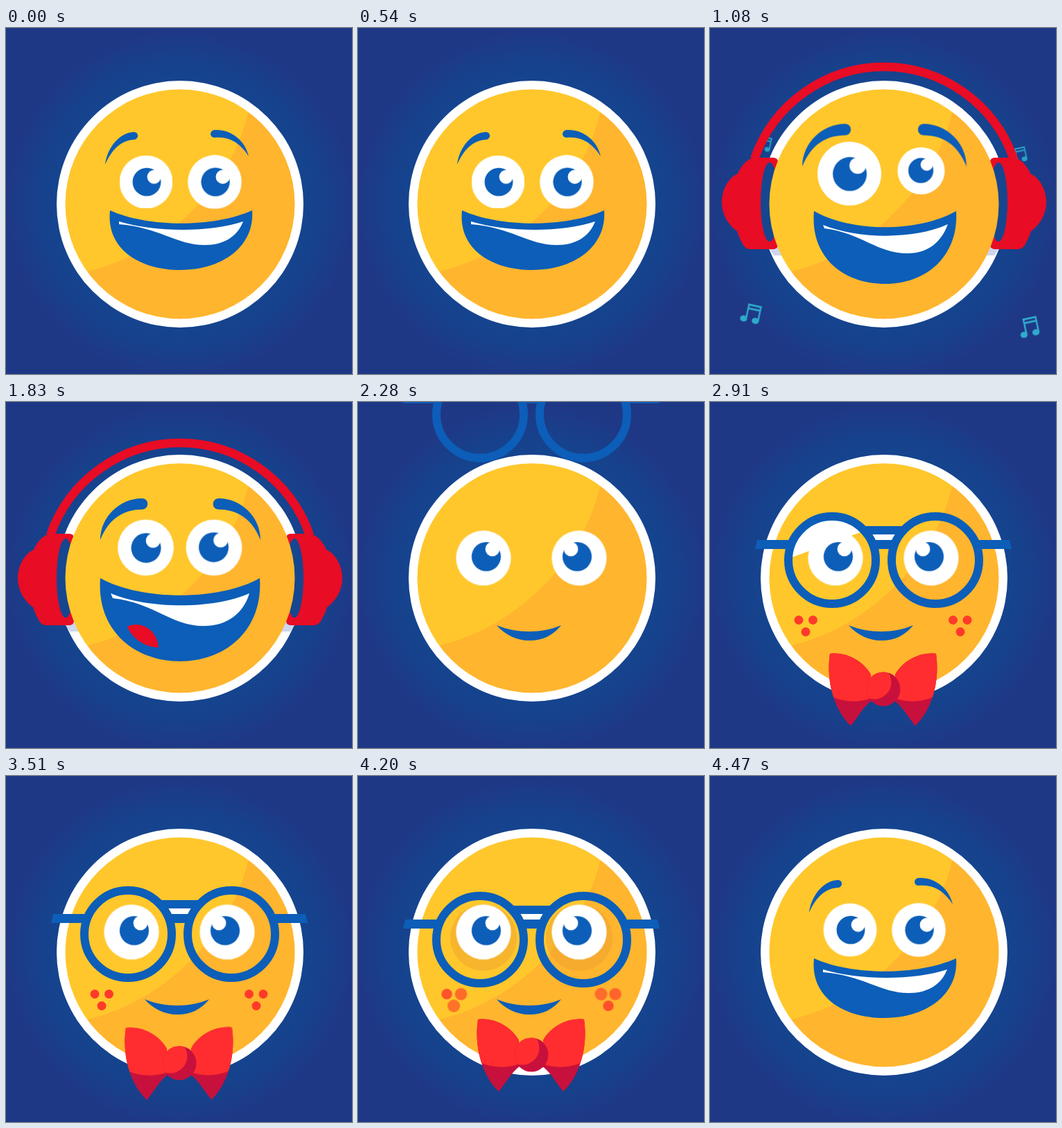
These frames come from a looping animation (499x499 px, 4500 ms). An HTML page:

```html
<!DOCTYPE html>
<html lang="en">
<head>
<meta charset="utf-8">
<title>Emoji moods</title>
<style>
html, body { margin: 0; width: 100%; height: 100%; overflow: hidden; background: #1f3886; }
svg { display: block; width: 100vw; height: 100vh; }
.a { animation: 4.5s ease-in-out infinite both; }
.blue { fill: #0c5eb8; }
.red { fill: #e80c25; }

/* headphones */
.phones { animation-name: phones; }
@keyframes phones {
  0%, 17.33% { transform: translateY(-335px); }
  21.33% { transform: translateY(8px); }
  24% { transform: translateY(-3px); }
  28.67% { transform: translateY(0); }
  31.33% { transform: translateY(4px); }
  34% { transform: translateY(0); }
  36.67% { transform: translateY(4px); }
  39.33%, 41.33% { transform: translateY(0); }
  43.33% { transform: translateY(10px); }
  48.67%, to { transform: translateY(-340px); }
}

/* music notes */
.note { fill: #2fb0cf; animation-timing-function: linear; }
.l { animation-name: rise-l; }
.r { animation-name: rise-r; }
@keyframes rise-l {
  0% { transform: translate(51px, 520px) rotate(12deg); opacity: 1; }
  7% { opacity: .85; }
  8.89% { transform: translate(86px, 60px) rotate(12deg) scale(.6); opacity: 0; }
  to { transform: translate(86px, 60px) scale(.6); opacity: 0; }
}
@keyframes rise-r {
  0% { transform: translate(465px, 520px) rotate(-12deg); opacity: 1; }
  7% { opacity: .85; }
  8.89% { transform: translate(439px, 60px) rotate(-12deg) scale(.6); opacity: 0; }
  to { transform: translate(439px, 60px) scale(.6); opacity: 0; }
}

/* eyes */
.eye-l { animation-name: eye-l; }
.eye-r { animation-name: eye-r; }
@keyframes eye-l {
  0%, 3.33%, 8.67%, 17.33%, 97.33%, to { transform: translate(202px, 222px) scale(.96); }
  6% { transform: translate(202px, 222px) scale(.96, .1); }
  24% { transform: translate(201px, 210px) scale(1.15); }
  29.33% { transform: translate(198px, 206px) scale(.85); }
  34.67% { transform: translate(201px, 210px) scale(1.15); }
  39.33%, 42% { transform: translate(201.5px, 210px) scale(1.01); }
  49.33%, 78%, 84%, 93.33% { transform: translate(181px, 225px) scale(.99); }
  81% { transform: translate(181px, 225px) scale(.99, .1); }
}
@keyframes eye-r {
  0%, 3.33%, 8.67%, 17.33%, 97.33%, to { transform: translate(301px, 222px) scale(.97); }
  6% { transform: translate(301px, 222px) scale(.97, .1); }
  24% { transform: translate(304.5px, 206px) scale(.85); }
  29.33% { transform: translate(301px, 210px) scale(1.15); }
  34.67% { transform: translate(304.5px, 206px) scale(.85); }
  39.33%, 42% { transform: translate(300px, 210px) scale(1.01); }
  49.33%, 78%, 84%, 93.33% { transform: translate(319px, 225px) scale(.99); }
  81% { transform: translate(319px, 225px) scale(.99, .1); }
}
.pupil-l { animation-name: pupil-l; }
.pupil-r { animation-name: pupil-r; }
@keyframes pupil-l {
  0%, 17.33%, 97.33%, to { transform: translate(1px, 0); }
  24%, 42% { transform: translate(.5px, .5px); }
  49.33%, 93.33% { transform: translate(4px, -2px); }
}
@keyframes pupil-r {
  0%, 17.33%, 97.33%, to { transform: translate(1px, 0); }
  24%, 42% { transform: translate(-.5px, -.5px); }
  49.33%, 93.33% { transform: translate(-3px, -2px); }
}
.spark-l { animation-name: spark-l; }
.spark-r { animation-name: spark-r; }
@keyframes spark-l {
  0%, 17.33%, 97.33%, to { transform: translate(11px, -7.5px); }
  24%, 42% { transform: translate(10px, -10.5px); }
  49.33%, 93.33% { transform: translate(9px, -11px); }
}
@keyframes spark-r {
  0%, 17.33%, 97.33%, to { transform: translate(11px, -7.5px); }
  24%, 42% { transform: translate(10px, -10px); }
  49.33%, 93.33% { transform: translate(-9px, -11px); }
}

/* brows */
.brows { transform-origin: 251px 170px; animation-name: brows; }
@keyframes brows {
  0%, 17.33%, 29.33%, 42%, 97.33%, to { transform: none; opacity: 1; }
  24% { transform: scale(1.025); }
  46%, 94% { transform: scale(.9); opacity: 0; }
}
.brow-l { animation-name: brow-l; }
.brow-r { animation-name: brow-r; }
@keyframes brow-l {
  0%, 17.33%, 94%, to { d: path("M143 197C146 172 164 151 184 150C192 150 192 160 185 161C168 162 154 172 143 197Z"); }
  24%, 50% { d: path("M136 199C136 165 165 139 196 139C207 139 207 155 196 155C170 155 148 168 136 199Z"); }
}
@keyframes brow-r {
  0%, 17.33%, 94%, to { d: path("M350 185C345 162 324 146 302 147C293 147 293 158 301 158C322 156 338 166 350 185Z"); }
  24%, 50% { d: path("M367 199C367 165 338 139 307 139C296 139 296 155 307 155C333 155 355 168 367 199Z"); }
}

/* mouth */
.mouth { animation-name: mouth; }
.teeth { fill: #fff; animation-name: teeth; }
.tongue { transform-origin: 200px 372px; animation-name: tongue; }
@keyframes mouth {
  0%, 17.33%, 97.33%, to { d: path("M150 263C205 288 300 288 355 263C359 315 312 349 252 349C192 349 144 318 150 263Z"); }
  24% { d: path("M150 264C205 295 300 295 355 264C359 327 314 369 253 369C192 369 144 330 150 264Z"); }
  30.67%, 42% { d: path("M136 254C195 287 308 287 366 254C371 328 318 374 251 374C184 374 130 328 136 254Z"); }
  49.33%, 93.33% { d: path("M200 322C229 334 265 334 293 322C281 337 266 344 247 344C229 344 212 336 200 322Z"); }
}
@keyframes teeth {
  0%, 17.33%, 97.33%, to { opacity: 1; d: path("M163 279C215 295 295 295 342 279C334 300 315 313 287 313C245 313 220 287 163 283Z"); }
  24% { d: path("M163 284C215 305 295 305 343 283C334 308 315 325 285 325C240 325 220 296 165 289Z"); }
  30.67%, 42% { opacity: 1; d: path("M151 276C205 299 300 299 351 276C342 306 318 323 285 323C238 323 215 290 154 283Z"); }
  48%, 93.33% { opacity: 0; d: path("M205 326C230 333 265 333 288 326C280 331 265 333 248 333C230 333 215 330 205 326Z"); }
}
@keyframes tongue {
  0%, 25.33% { transform: scale(0); }
  30.67%, 42% { transform: none; }
  45.33%, to { transform: scale(0); }
}

/* glasses */
.glasses { transform-origin: 250px 228px; animation-name: glasses; }
@keyframes glasses {
  0%, 48.67% { transform: translateY(-330px); }
  53.33% { transform: translateY(-20px); }
  55.33% { transform: translateY(13px) rotate(1deg); }
  56% { transform: translateY(10px) rotate(.8deg); }
  58.67% { transform: translateY(-4px) rotate(-.5deg); }
  61.33%, 90% { transform: none; }
  93.33% { transform: translateY(8px); }
  97.33%, to { transform: translateY(-330px); }
}
.shade { fill: #e89a30; animation-name: shade; }
@keyframes shade {
  0%, 53.33%, 64%, 90%, 96%, to { opacity: 0; }
  56%, 93.33% { opacity: .38; }
}
.glint { fill: #fff; animation-name: glint; animation-timing-function: linear; }
@keyframes glint {
  0%, 62% { transform: rotate(-20deg) translateY(-62px); }
  64.67% { transform: rotate(-20deg) translateY(-24px); }
  72%, to { transform: rotate(-20deg) translateY(110px); }
}

/* freckles */
.dot { fill: #ff3a2a; transform-box: fill-box; transform-origin: center; animation-name: dot; }
.d1 { animation-delay: 30ms; }
.d2 { animation-delay: 65ms; }
@keyframes dot {
  0%, 53.33% { transform: scale(0); opacity: 1; }
  55.33% { transform: scale(1.24); }
  58%, 67%, 73%, 90.67% { transform: none; opacity: 1; }
  70% { transform: scale(1.12); }
  93.33% { transform: scale(1.4); opacity: .6; }
  95.33%, to { transform: scale(1.2); opacity: 0; }
}

/* bow tie */
.bow { transform-origin: 249.5px 414px; animation-name: bow; }
@keyframes bow {
  0%, 52.67% { transform: translateY(165px); }
  55.33% { transform: translateY(-15px) rotate(9deg); }
  56% { transform: translateY(-10px) rotate(8deg); }
  58.67% { transform: translateY(3px) rotate(-4deg); }
  61.33% { transform: rotate(1.5deg); }
  64.67%, 77.33%, 90% { transform: none; }
  80% { transform: rotate(-2deg); }
  84% { transform: rotate(2deg); }
  88% { transform: none; }
  93.33% { transform: translateY(-12px); }
  97.33%, to { transform: translateY(165px); }
}
</style>
</head>
<body>
<svg viewBox="0 0 499 499">
  <defs>
    <radialGradient id="glow" gradientUnits="userSpaceOnUse" cx="251" cy="254" r="250">
      <stop offset=".7" stop-color="#15448e"/>
      <stop offset=".82" stop-color="#17418c"/>
      <stop offset="1" stop-color="#1f3886"/>
    </radialGradient>
    <clipPath id="disc"><circle cx="251" cy="254" r="165.5"/></clipPath>
    <clipPath id="lens"><circle r="58"/></clipPath>
    <clipPath id="knot"><circle cx="250" cy="414" r="24.5"/></clipPath>
    <path id="wing-shape" d="M173 363C195 360 220 372 232 393L234 430C222 438 213 455 203 467C180 445 167 405 173 363Z"/>
    <clipPath id="wing-clip"><use href="#wing-shape"/></clipPath>
    <g id="wing">
      <use href="#wing-shape" fill="#c8103c"/>
      <path clip-path="url(#wing-clip)" fill="#ff2d2f" d="M160 350H240V424C222 434 196 434 176 425H160Z"/>
    </g>
    <g id="cup">
      <path fill="#cdd6ee" d="M78 310H110V331H92Z"/>
      <path class="red" d="M62 190H92Q98 191 98 196V316Q98 321 92 322H58Q52 322 48 316Q42 306 39 296C30 290 17 275 17 254C17 235 28 218 40 213Q48 195 62 190Z"/>
      <ellipse cx="86" cy="254" rx="13" ry="57" fill="#16468f"/>
    </g>
    <g id="note">
      <ellipse cx="-10" cy="10" rx="5.6" ry="4.8"/>
      <ellipse cx="9" cy="10" rx="5.6" ry="4.8"/>
      <path d="M-7.4-15H14.6V10H12V-6H-4.8V10H-7.4ZM-4.8-12V-9H12V-12Z" fill-rule="evenodd"/>
    </g>
  </defs>

  <rect width="499" height="499" fill="url(#glow)"/>

  <use href="#note" class="a note l" style="animation-delay:774ms"/>
  <use href="#note" class="a note r" style="animation-delay:788ms"/>
  <use href="#note" class="a note l" style="animation-delay:987ms"/>
  <use href="#note" class="a note r" style="animation-delay:1004ms"/>
  <use href="#note" class="a note l" style="animation-delay:1200ms"/>
  <use href="#note" class="a note r" style="animation-delay:1220ms"/>
  <use href="#note" class="a note l" style="animation-delay:1390ms"/>
  <use href="#note" class="a note r" style="animation-delay:1410ms"/>

  <circle cx="251" cy="254" r="178" fill="#fff"/>
  <g class="a phones">
    <path d="M64 192A198 198 0 0 1 438 192" fill="none" stroke="#e80c25" stroke-width="12.5"/>
    <use href="#cup"/>
    <use href="#cup" transform="matrix(-1 0 0 1 502 0)"/>
  </g>

  <g clip-path="url(#disc)">
    <rect x="80" y="80" width="345" height="345" fill="#ffc72c"/>
    <path d="M352 110L349 123C324 227 230 325 118 351L80 360V430H430V110Z" fill="#ffb52e"/>
  </g>

  <g class="a shade">
    <circle cx="181" cy="233" r="48"/>
    <circle cx="319" cy="233" r="48"/>
  </g>
  <g transform="translate(176 228)" clip-path="url(#lens)">
    <rect class="a glint" x="-90" y="-42" width="180" height="42"/>
  </g>
  <g transform="translate(325 228)" clip-path="url(#lens)">
    <rect class="a glint" x="-90" y="-42" width="180" height="42" style="animation-delay:220ms"/>
  </g>

  <g class="a brows blue">
    <path class="a brow-l"/>
    <path class="a brow-r"/>
  </g>
  <g class="a eye-l">
    <circle r="40" fill="#fff"/>
    <g class="a pupil-l">
      <circle r="21.3" class="blue"/>
      <circle r="10.4" fill="#fff" class="a spark-l"/>
    </g>
  </g>
  <g class="a eye-r">
    <circle r="40" fill="#fff"/>
    <g class="a pupil-r">
      <circle r="21.3" class="blue"/>
      <circle r="10.4" fill="#fff" class="a spark-r"/>
    </g>
  </g>

  <path class="a mouth blue"/>
  <path class="a tongue red" d="M175 324C190 316 217 324 220 354C204 354 183 344 175 324Z"/>
  <path class="a teeth"/>

  <circle class="a dot d2" cx="128" cy="314.5" r="6.5"/>
  <circle class="a dot d1" cx="148.5" cy="314.5" r="6.5"/>
  <circle class="a dot" cx="138" cy="331.5" r="6.5"/>
  <circle class="a dot" cx="350.5" cy="314.5" r="6.5"/>
  <circle class="a dot d1" cx="371" cy="314.5" r="6.5"/>
  <circle class="a dot d2" cx="361" cy="331.5" r="6.5"/>

  <g class="a glasses">
    <path d="M234 190H268L262 201H240Z" fill="#fff"/>
    <path class="blue" d="M220 179H281V191H220ZM236 199H265V212H236ZM68 199H114V212H65ZM388 199H432L435 212H388Z"/>
    <g fill="none" stroke="#0c5eb8" stroke-width="12">
      <circle cx="176" cy="228" r="63"/>
      <circle cx="325" cy="228" r="63"/>
    </g>
  </g>

  <g class="a bow">
    <use href="#wing"/>
    <use href="#wing" transform="matrix(-1 0 0 1 499 0)"/>
    <g clip-path="url(#knot)">
      <rect x="224" y="388" width="52" height="52" fill="#c8103c"/>
      <circle cx="237" cy="404" r="24.5" fill="#ff2d2f"/>
    </g>
  </g>
</svg>
</body>
</html>
```
